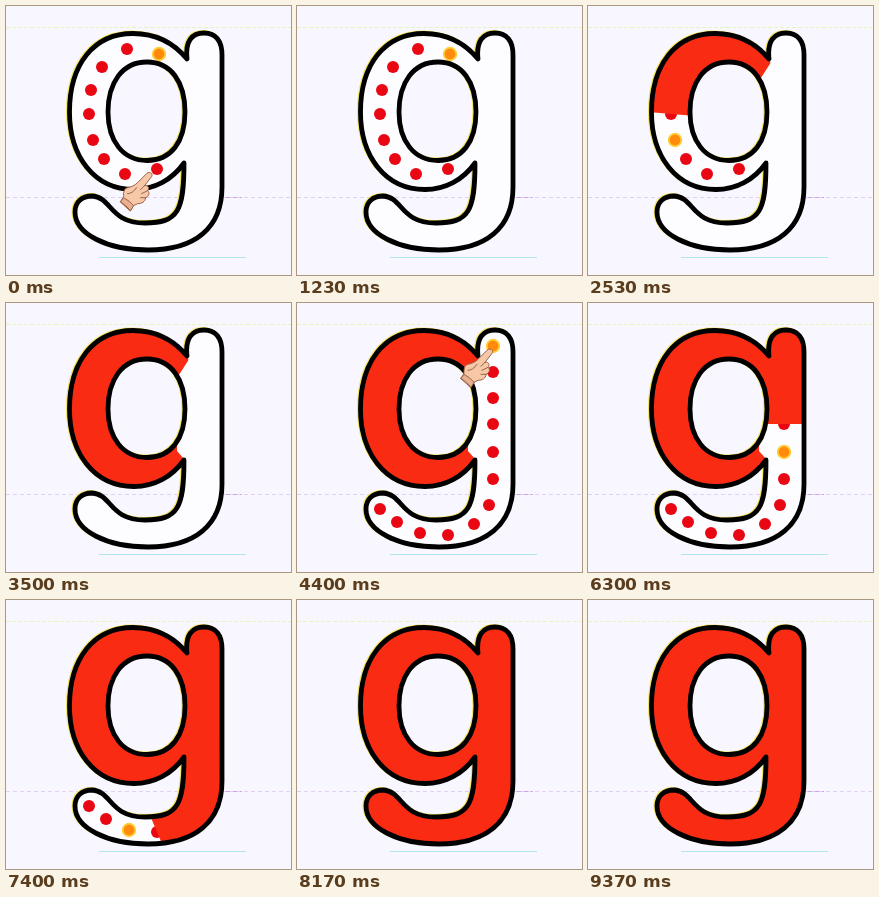
An HTML page for the animation above (9.41 s loop, 285 px wide and 269 px high).

```html
<!DOCTYPE html>
<html lang="en">
<head>
<meta charset="utf-8">
<title>Trace the letter g</title>
<style>
  html, body { margin: 0; width: 100%; height: 100%; overflow: hidden; background: #f8f6ff; }
  svg { display: block; width: 100%; height: 100%; }
  .fill { fill: none; stroke: #f92b13; stroke-width: 60; stroke-linejoin: round; }
</style>
</head>
<body>
<svg viewBox="0 0 285 269">
  <defs>
    <path id="letter" fill-rule="evenodd" clip-rule="evenodd" d="M181 53 C179 35 186 27 198 27 C210 27 216 35 216 49 V181
      C216 222 189 244 142 244 C101 244 69 228 69 206 C69 196 76 190 86 190 C106 191 103 217 139 217
      C172 217 178 205 178 157 C166 174 148 183.5 128 183.5 C88 183.5 63.5 150 63.5 106 C63.5 58 88 27.5 127 27.5
      C149 27.5 167 36 181 53 Z
      M141 56 C116 56 102 77 102 106 C102 135 117 154.5 141 154.5 C165 154.5 179 136 179 106 C179 76 165 56 141 56 Z"/>
    <clipPath id="inside"><use href="#letter"/></clipPath>
    <clipPath id="bowl"><path d="M0 0H181V53C186 62 180 68 171 74V148L178 156V188H0Z"/></clipPath>
  </defs>

  <g fill="none">
    <path d="M0 21.5H285" stroke="#e8f4c0" stroke-dasharray="4 2"/>
    <path d="M0 191.5H285" stroke="#e2d0f4" stroke-dasharray="4 3"/>
    <path d="M178 191.5H236" stroke="#cfa6e4" stroke-dasharray="4 3"/>
    <path d="M93 251.5H240" stroke="#b0e6ee"/>
  </g>
  <use href="#letter" transform="translate(-1.2 -.6)" fill="none" stroke="#f3e35a" stroke-width="4.6"/>

  <use href="#letter" fill="#fdfcff"/>
  <g id="dots"></g>
  <g id="fills" clip-path="url(#inside)">
    <path class="fill" clip-path="url(#bowl)"/>
    <path class="fill"/>
  </g>
  <use href="#letter" fill="none" stroke="#000" stroke-width="4.8" stroke-linejoin="round"/>

  <g id="hand" stroke="#9a6248" stroke-linejoin="round" stroke-linecap="round">
    <path fill="#f6c8a8" d="M-32 32 L-29 27 C-29 23 -29 19 -25 18 C-21 17 -18 16 -15 13
      L-6 4 C-3 1 1 4 -1 7 L-8 16 C-4 15 -3 19 -5 21 C-2 23 -4 27 -7 28 C-7 32 -11 34 -15 34
      L-19 36 L-22 41 Z"/>
    <path fill="none" d="M-8 16L-12 20M-5 21L-11 24M-7 28L-12 28M-25 24Q-20 24 -16 18"/>
    <path fill="#e9b08f" d="M-32 32L-29 28Q-23 31 -19 36L-22 41Q-26 36 -32 32Z"/>
  </g>
</svg>
<script>
const LOOP = 9410;
const DOT_INTERVAL = 220;
const SWITCH_TIME = 4000;

// First and last points are lead-in and lead-out; the rest carry dots.
// The first dot is reached at `start`; the hand shows the way during `demo`.
const strokes = [
  { points: [[178, 64], [153, 48], [121, 43], [96, 61], [85, 84], [83, 108], [87, 134],
             [98, 153], [119, 168], [151, 163], [178, 146]],
    start: 1540, demo: [-900, 20] },
  { points: [[196, 20], [196, 43], [196, 69], [196, 95], [196, 121], [196, 149], [196, 176],
             [192, 202], [177, 221], [151, 232], [123, 230], [100, 219], [83, 206], [67, 190]],
    start: 5530, demo: [4400, 5300] }
];

const byId = id => document.getElementById(id);
const clamp = (v, lo, hi) => Math.max(lo, Math.min(hi, v));
const hand = byId("hand");

function make(tag, attrs = {}) {
  const node = document.createElementNS("http://www.w3.org/2000/svg", tag);
  for (const key in attrs) node.setAttribute(key, attrs[key]);
  return node;
}

strokes.forEach((stroke, i) => {
  const spots = stroke.points.slice(1, -1);
  stroke.fill = byId("fills").children[i];
  stroke.guide = make("path", { d: "M" + spots.join("L") });
  stroke.group = byId("dots").appendChild(make("g"));
  stroke.dots = spots.map(([cx, cy]) =>
    stroke.group.appendChild(make("circle", { cx, cy, "stroke-width": 1.8 })));
});

function drawStroke({ points, start, fill, group, dots }, t, active) {
  const reached = clamp(Math.floor((t - start) / DOT_INTERVAL) + 1, 0, dots.length);
  const complete = reached === dots.length;
  const path = complete ? points : points.slice(0, reached + 1);
  fill.setAttribute("d", "M" + path.join("L"));

  group.style.display = active ? "" : "none";
  dots.forEach((dot, i) => {
    const isNext = i === reached;
    dot.setAttribute("r", isNext ? 6.3 : 6);
    dot.setAttribute("fill", isNext ? "#ff8a0c" : "#e80712");
    dot.setAttribute("stroke", isNext ? "#ffd036" : "none");
  });
}

function drawHand({ demo: [start, end], guide }, t) {
  const visible = t > start - 250 && t < end + 200;
  hand.style.display = visible ? "" : "none";
  const along = clamp((t - start) / (end - start), 0, 1);
  const { x, y } = guide.getPointAtLength(guide.getTotalLength() * along);
  hand.setAttribute("transform", `translate(${x} ${y})`);
}

function frame() {
  const t = performance.now() % LOOP;
  const current = t < SWITCH_TIME ? 0 : 1;
  strokes.forEach((stroke, i) => drawStroke(stroke, t, i === current));
  drawHand(strokes[current], t);
  requestAnimationFrame(frame);
}
frame();
</script>
</body>
</html>
```
